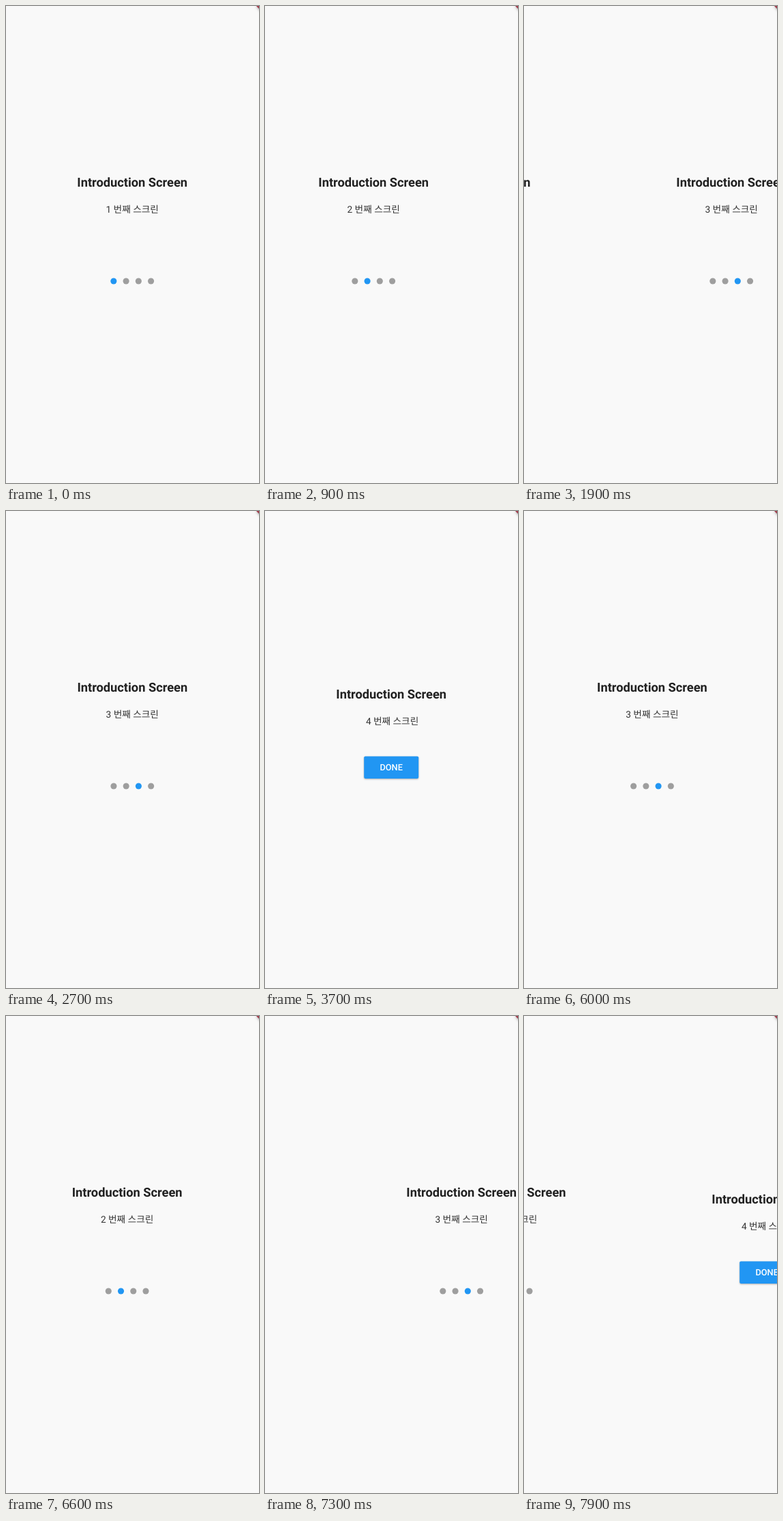
Animation of 371 by 697 pixels, one loop 8 s. Source, as an HTML page:

```html
<!DOCTYPE html>
<html lang="ko">
<head>
<meta charset="utf-8">
<title>Introduction Screen</title>
<style>
  html, body { margin: 0; width: 100%; height: 100%; overflow: hidden; background: #f9f9f9; }
  svg { display: block; }
  text {
    font-family: Roboto, "Noto Sans CJK KR", "Noto Sans CJK", sans-serif;
    text-anchor: middle;
    text-rendering: geometricPrecision;
    fill: #212121;
  }
  .title { font-size: 18.25px; font-weight: 700; }
  .subtitle { font-size: 13.68px; fill: #333; }
  .label { font-size: 12.77px; font-weight: 500; fill: #fff; }
  .button { fill: #2196f3; filter: drop-shadow(0 1.3px .8px rgba(0, 0, 0, .3)); }
  .ribbon { fill: #a03a4a; filter: drop-shadow(0 0 2.2px rgba(0, 0, 0, .5)); }
</style>
</head>
<body>
<svg width="371" height="697" viewBox="0 0 371 697">
  <g id="track"></g>
  <path class="ribbon" d="M367 0H375V8z"/>
</svg>
<script>
const LOOP = 8000, STEP = 100, PAGE_WIDTH = 375.5, CENTER = 185.2;
const SPRING_DECAY = 0.404; // share of the distance left after each step
const track = document.getElementById('track');

const text = (kind, x, y, content) => `<text class="${kind}" x="${x}" y="${y}">${content}</text>`;

const dots = active => [0, 1, 2, 3].map(i =>
  `<circle cx="${CENTER + (i - 1.5) * 18.24}" cy="402" r="4.56" fill="${i === active ? '#2196f3' : '#9e9e9e'}"/>`
).join('');

const button =
  `<rect class="button" x="145.2" y="358.5" width="80" height="32.4" rx="1.8"/>` +
  text('label', CENTER, 379.4, 'DONE');

function page(i) {
  const last = i === 3, drop = last ? 10 : 0;
  return `<g transform="translate(${i * PAGE_WIDTH})">` +
    text('title', CENTER, 264.4 + drop, 'Introduction Screen') +
    text('subtitle', CENTER + (last ? 1.4 : 0), 301.8 + drop, `${i + 1} 번째 스크린`) +
    (last ? button : dots(i)) + '</g>';
}
track.innerHTML = [0, 1, 2, 3].map(page).join('');

// Each swipe: start time, page it refers to, that page's dragged offsets
// per step, and total steps; steps after the drag spring towards zero.
const swipes = [
  { at: 0,    page: 0, drag: [0], steps: 1 },
  { at: 500,  page: 1, drag: [292.5, -55, -65], steps: 3 },
  { at: 900,  page: 1, drag: [-26], steps: 5 },
  { at: 1900, page: 2, drag: [119], steps: 9 },
  { at: 3400, page: 3, drag: [150, 20, 3, 0], steps: 4 },
  { at: 5400, page: 2, drag: [-132, 20, 43], steps: 3 },
  { at: 5800, page: 2, drag: [17], steps: 3 },
  { at: 6300, page: 1, drag: [-115], steps: 8 },
  { at: 7200, page: 2, drag: [344.5, 103], steps: 6 },
  { at: 7900, page: 3, drag: [171], steps: 1 }
];

function trackX(time) {
  const swipe = swipes.findLast(s => s.at <= time);
  const step = Math.min(Math.floor((time - swipe.at) / STEP), swipe.steps - 1);
  const dragEnd = swipe.drag.length - 1;
  const offset = step <= dragEnd
    ? swipe.drag[step]
    : swipe.drag[dragEnd] * SPRING_DECAY ** (step - dragEnd);
  return offset - swipe.page * PAGE_WIDTH;
}

const start = performance.now();
function draw() {
  const time = (performance.now() - start) % LOOP;
  track.setAttribute('transform', `translate(${trackX(time).toFixed(2)})`);
  requestAnimationFrame(draw);
}
draw();
</script>
</body>
</html>
```
